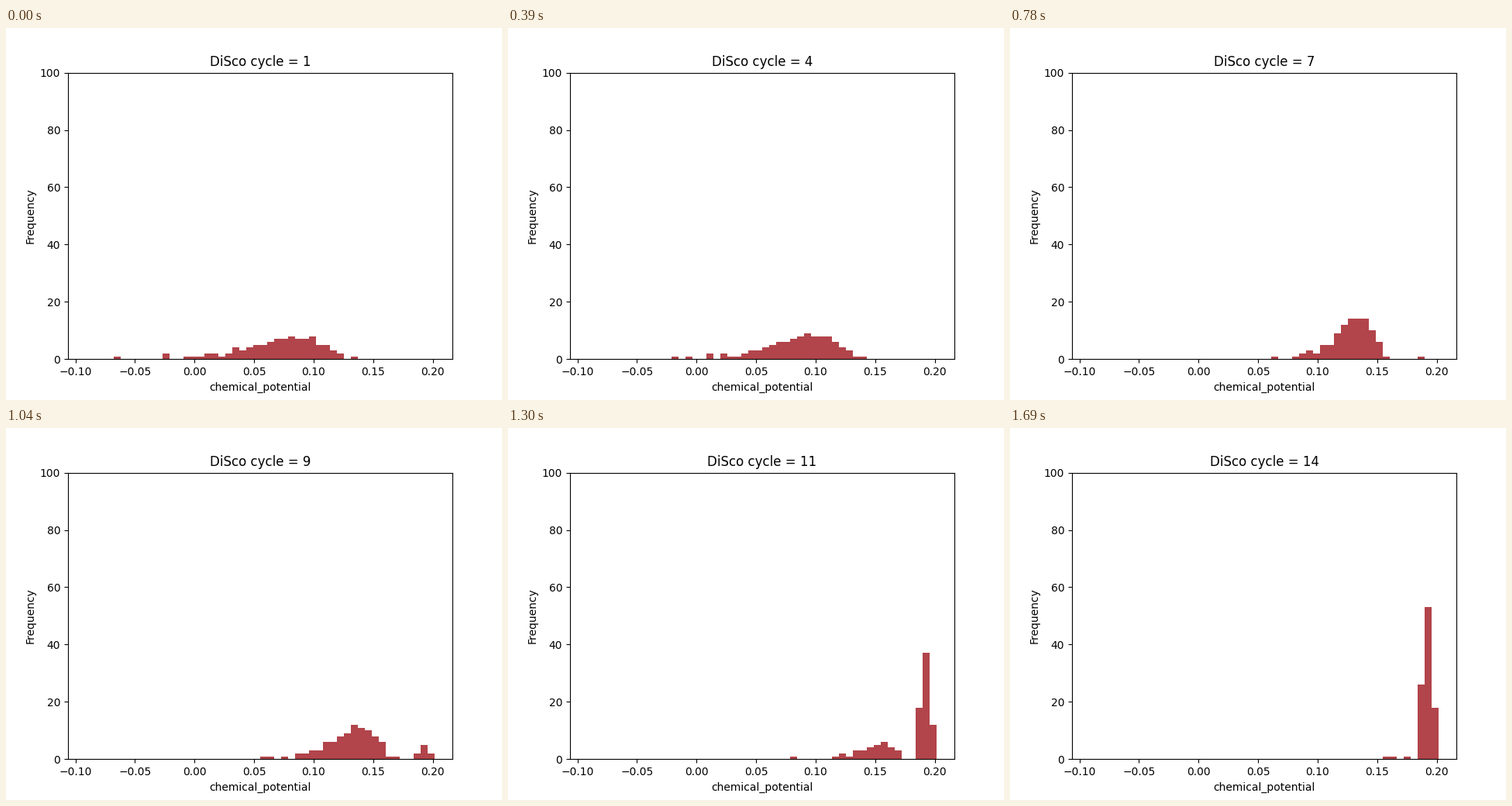
These frames come from a looping animation (640x480 px, 1.82 s). A matplotlib script:

```python
import matplotlib.pyplot as plt
import numpy as np
from matplotlib.animation import FuncAnimation

BINS = 50
CYCLES = 14
SAMPLES = 100
LOW, HIGH = -0.09159, 0.20189

# Drift of the searching samples, in bins
KEY_CYCLES = [1, 4, 7, 10, 12]
PEAK = [30.2, 32.3, 38.6, 39.7, 44.3]
SPREAD = [4.8, 4.3, 2.4, 3.2, 1.2]


def skewed(rng, count, peak, spread):
    """Evenly stratified draws with a long tail to the left."""
    u = (np.arange(count) + rng.random(count)) / count
    return peak + spread * np.log(-np.log(1 - u))


def counts_at(cycle):
    rng = np.random.default_rng(cycle)
    share = 1 / (1 + np.exp(-1.5 * (cycle - 10.5)))
    settled = round(0.98 * SAMPLES * share)
    peak = np.interp(cycle, KEY_CYCLES, PEAK)
    spread = np.interp(cycle, KEY_CYCLES, SPREAD)
    searching = skewed(rng, SAMPLES - settled, peak, spread)
    converged = np.clip(skewed(rng, settled, 48.7, 0.6), 47, BINS)
    values = np.clip(np.concatenate([searching, converged]), 0, BINS)
    return np.histogram(values, bins=BINS, range=(0, BINS))[0]


fig, ax = plt.subplots(figsize=(6.4, 4.8), dpi=100)
edges = np.linspace(LOW, HIGH, BINS + 1)
bars = ax.bar(edges[:-1], np.zeros(BINS), width=np.diff(edges), align="edge",
              color="#b2444b", linewidth=0)
margin = 0.05 * (HIGH - LOW)
ax.set_xlim(LOW - margin, HIGH + margin)
ax.set_ylim(0, 100)
ax.set_xlabel("chemical_potential")
ax.set_ylabel("Frequency")
title = ax.set_title("")


def update(frame):
    cycle = frame + 1
    for bar, count in zip(bars, counts_at(cycle)):
        bar.set_height(count)
    title.set_text(f"DiSco cycle = {cycle}")
    return [*bars, title]


anim = FuncAnimation(fig, update, frames=CYCLES, interval=130,
                     repeat=True, repeat_delay=0, blit=False)
plt.show()
```
